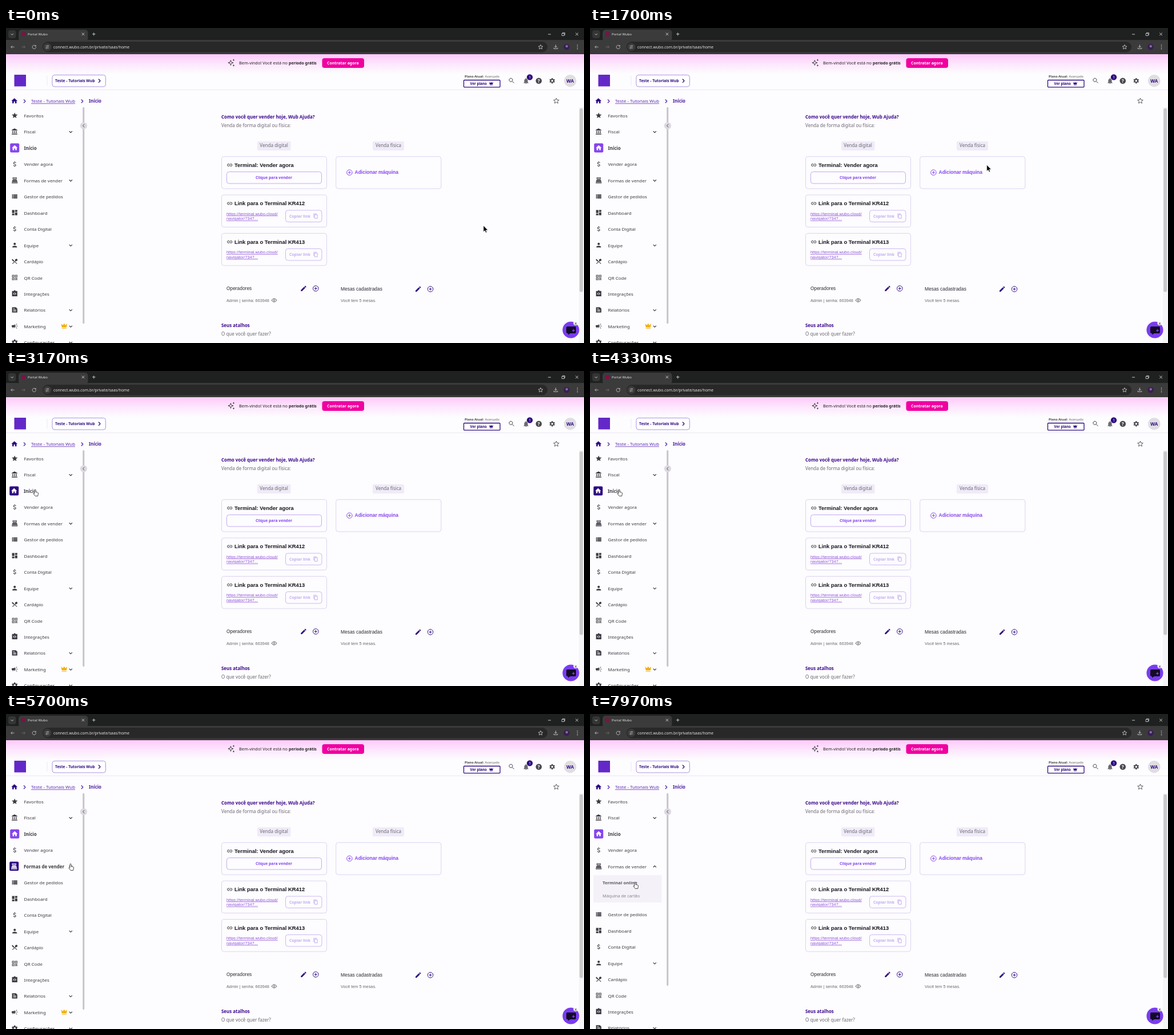
An HTML page that plays this animation: 1012 px wide and 553 px high, repeating every 8000 ms.

```html
<!DOCTYPE html>
<html lang="pt-BR">
<head>
<meta charset="utf-8">
<title>Portal Wubo</title>
<style>
html, body { margin: 0; width: 100%; height: 100%; overflow: hidden; background: #fdfcfe; }
svg { display: block; width: 100vw; height: 100vh; }
text { white-space: pre; }
</style>
</head>
<body>
<svg id="stage" viewBox="0 0 1012 553">
  <defs>
    <linearGradient id="banner" x1="0" y1="0" x2="0" y2="1">
      <stop offset="0" stop-color="#fdc9fb"/><stop offset=".5" stop-color="#fde6fd"/><stop offset="1" stop-color="#fdfcfe"/>
    </linearGradient>
    <clipPath id="subClip"><rect id="subBox" x="6" y="283" width="120" height="0"/></clipPath>
  </defs>
</svg>
<script>
const NS = 'http://www.w3.org/2000/svg';
const stage = document.getElementById('stage');
const NOTO = '"Noto Sans", sans-serif', ARIAL = '"Liberation Sans", Arial, sans-serif';
const NAVY = '#2d0a82', VIOLET = '#8445ee', INK = '#3c3a42', GREY = '#6a6870', LIGHT = '#d6d6d6';

function el(tag, attrs, parent = stage) {
  const e = document.createElementNS(NS, tag);
  for (const k in attrs) e.setAttribute(k, attrs[k]);
  parent.appendChild(e);
  return e;
}
function label(x, y, str, size, fill, weight = 400, font = NOTO, parent = stage, extra = {}) {
  const t = el('text', { x, y, 'font-size': size, fill, 'font-weight': weight, 'font-family': font, ...extra }, parent);
  t.textContent = str;
  return t;
}
const box = (x, y, width, height, fill, rx = 0, stroke = 'none', parent = stage) =>
  el('rect', { x, y, width, height, fill, rx, stroke, 'stroke-width': .8 }, parent);
const disc = (cx, cy, r, fill, stroke = 'none', sw = 1) =>
  el('circle', { cx, cy, r, fill, stroke, 'stroke-width': sw });
const line = (d, stroke, sw = 1, parent = stage) =>
  el('path', { d, stroke, 'stroke-width': sw, fill: 'none', 'stroke-linejoin': 'round' }, parent);

// Icons live on a 24-unit grid; "~" marks an outline icon.
const ICONS = {
  star: 'M12 17.3 18.2 21l-1.7-7L22 9.2l-7.2-.6L12 2 9.2 8.6 2 9.2 7.5 14l-1.7 7z',
  bank: 'M4 10v7h3v-7zm6 0v7h3v-7zM2 22h19v-3H2zm14-12v7h3v-7zM11.5 1 2 6v2h19V6z',
  home: 'M10 20v-6h4v6h5v-8h3L12 3 2 12h3v8z',
  money: '~M16 8.5C16 5.5 8 5 8 9s8 2.5 8 6.5-8 3.5-8 0M12 3v3m0 12v3',
  till: 'M5 2h14v6H5zm2 2v2h10V4zM2 19h20v3H2zM6 9h12l4 9H2zm1 2v2h2v-2zm4 0v2h2v-2zm4 0v2h2v-2z',
  list: 'M3 5h4v4H3zm0 5h4v4H3zm0 5h4v4H3zM8 5h13v4H8zm0 5h13v4H8zm0 5h13v4H8z',
  tiles: 'M3 13h8V3H3zm0 8h8v-6H3zm10 0h8V11h-8zm0-18v6h8V3z',
  person: 'M12 12a4 4 0 1 0 0-8 4 4 0 0 0 0 8m0 2c-2.7 0-8 1.3-8 4v2h16v-2c0-2.7-5.3-4-8-4',
  cutlery: 'M8 13.3l2.9-2.8-7-7a4 4 0 0 0 0 5.7zm6.9-1.8c1.5.7 3.7.2 5.3-1.4 4-4-1.4-9.2-5.3-5.3-1.6 1.6-2.1 3.7-1.4 5.3L3.7 19.9l1.4 1.4 6.9-6.9 6.9 6.9 1.4-1.4-6.9-6.9z',
  code: 'M3 3h8v8H3zm2 2v4h4V5zM3 13h8v8H3zm2 2v4h4v-4zm8-12h8v8h-8zm2 2v4h4V5zm-2 8h3v3h-3zm5 0h3v3h-3zm-2.500 2.500h3v3h-3zM13 18h3v3h-3zm5 0h3v3h-3z',
  plug: 'M3 3h6a3 3 0 0 1 6 0h6v18H3zM10.500 8l-4 4 4 4 1.200-1.200L8.900 12l2.800-2.800zm3 0-1.200 1.200 2.800 2.800-2.800 2.800 1.200 1.200 4-4z',
  page: 'M3 3h13l5 5v13H3zm4 4v2h5V7zm0 4v2h10v-2zm0 4v2h10v-2z',
  horn: 'M2 9h6l5-3v12l-5-3H7v4H5v-4H2zm16 2h4v2h-4zm-2-4.600L19.200 4l1.200 1.600L17.200 8zm0 11.200 3.200 2.400 1.200-1.600-3.200-2.400zM14 8.600a4.500 4.500 0 0 1 0 6.700z',
  bell: 'M10 20h4a2 2 0 0 1-4 0m8-4v-5c0-3-1.600-5.600-4.500-6.300V4a1.500 1.500 0 0 0-3 0v.7C7.600 5.400 6 8 6 11v5l-2 2v1h16v-1z',
  pencil: 'M3 17.200V21h3.800L17.800 9.900 14 6.200zM20.700 7a1 1 0 0 0 0-1.400l-2.300-2.300a1 1 0 0 0-1.400 0l-1.900 1.800 3.800 3.800z',
  crown: 'M5 16 3 5l5.500 5L12 4l3.500 6L21 5l-2 11zm0 2h14v2H5z',
  link: '~M10.500 7.500H7a4.500 4.500 0 0 0 0 9h3.500M13.500 7.500H17a4.500 4.500 0 0 1 0 9h-3.500M8 12h8',
  plus: '~M12 2.500a9.500 9.500 0 1 0 .01 0M12 7v10M7 12h10',
  copy: '~M8 6h12v16H8zM4 18V2h13',
  eye: '~M1.500 12Q12-2 22.500 12 12 26 1.500 12zM12 9a3 3 0 1 0 .01 0',
  search: '~M9.500 3.500a6 6 0 1 0 .01 0M14 14l6.500 6.500',
  gear: 'M10 2h4l.6 3 2.400 1.400 2.900-1 2 3.500L19.600 11v2l2.300 2-2 3.500-2.900-1-2.400 1.400-.6 3h-4l-.6-3L7 17.500l-2.900 1-2-3.500L4.400 13v-2L2.100 9l2-3.500 2.900 1L9.400 5zm2 6.500a3.500 3.500 0 1 0 .01 0',
  load: '~M12 3v11M7 10l5 5 5-5M4 16v4h16v-4',
  back: '~M21 12H4M11 5l-7 7 7 7',
  next: '~M3 12h17M13 5l7 7-7 7',
  reload: '~M19 7.500A8.500 8.500 0 1 0 20.500 12M20 3v5.500h-5.500',
  tune: '~M3 7h8m7 0h3M3 17h3m7 0h8M15 4a3 3 0 1 0 .01 0M9 14a3 3 0 1 0 .01 0',
  spark: '~M11 4l2 6 6 2-6 2-2 6-2-6-6-2 6-2zM20 1v5M17.500 3.500h5M20 18v5M17.500 20.500h5'
};
function icon(name, cx, cy, size, color, parent = stage, sw = 2) {
  const d = ICONS[name], k = size / 24, open = d[0] === '~';
  return el('path', {
    d: open ? d.slice(1) : d, transform: `translate(${cx - size / 2} ${cy - size / 2}) scale(${k})`,
    fill: open ? 'none' : color, stroke: open ? color : 'none', 'stroke-width': sw, 'fill-rule': 'evenodd'
  }, parent);
}

function drawBrowser() {
  box(0, 0, 1012, 22, '#1f2020');
  box(0, 21, 1012, 25, '#3b3b3b');
  box(22, 3, 121.5, 20, '#3b3b3b', 5);
  box(4, 4, 13.5, 14, '#343535', 4);
  line('M8.500 10l2.200 2.200L13 10', LIGHT, .9);
  box(27, 7.5, 6.5, 6.5, '#7c1247');
  label(38, 13, 'Portal Wubo', 6, '#e4e4e4');
  line('M132.800 8.500l4.400 4.400m0-4.400l-4.400 4.400', LIGHT, .9);
  line('M151 10.700h5.500M153.750 8v5.500', LIGHT, .9);
  line('M949 11h5', LIGHT, .9);
  line('M973.200 9.500h4v4h-4zM974.500 9.500V8.300h4v4h-1.200', LIGHT, .8);
  line('M997.200 8.400l4.800 4.800m0-4.800l-4.800 4.800', LIGHT, .9);
  icon('back', 11.5, 33.3, 8.5, LIGHT);
  icon('next', 30.5, 33.3, 8.5, '#777');
  icon('reload', 49.3, 33.3, 9, LIGHT);
  box(64, 24, 884, 18.5, '#282828', 9.2);
  disc(72.3, 33.3, 7, '#3b3b3b');
  icon('tune', 72.3, 33.3, 8, LIGHT);
  label(83, 35.8, 'connect.wubo.com.br/private/saas/home', 6.86, '#e4e4e4');
  const star = icon('star', 936, 33.3, 9.5, 'none');
  star.setAttribute('stroke', LIGHT);
  icon('load', 962.5, 33, 10, LIGHT);
  disc(981.5, 33.3, 5.3, '#35214f');
  disc(981.8, 32, 2.2, '#8d62a8');
  for (const y of [30, 33.3, 36.6]) disc(1000.5, y, .8, LIGHT);
}

function drawHeader() {
  box(0, 46, 1012, 34, 'url(#banner)');
  icon('spark', 394, 61, 13.5, INK, stage, 1.7);
  label(408, 64, 'Bem-vindo! Você está no', 7.37, '#222');
  label(495, 64, 'período grátis', 6.95, '#222', 700);
  box(553.5, 53, 73.5, 17, '#f000a0', 4);
  label(562, 64, 'Contratar agora', 6.95, '#fff', 700);

  box(14.5, 82, 20.5, 20.5, '#6428c8');
  line('M72 84v17', '#e6e2ee', .7);
  box(81, 82.5, 93.5, 20.500, '#fff', 4, '#9b7ae0');
  label(86, 95.2, 'Teste - Tutoriais Wub', 6.7, NAVY, 700);
  line('M162 89.500l3 3.200-3 3.200', NAVY, 1.3);
  label(803, 87.4, 'Plano Atual:', 5.55, '#444', 700);
  label(838.5, 87.4, 'Avançado', 5.55, '#666');
  el('rect', { x: 801.5, y: 91.500, width: 63.500, height: 12.300, fill: '#fff', stroke: NAVY, 'stroke-width': 1.3, rx: 1 });
  label(812.5, 100, 'Ver plano', 6.2, NAVY, 700);
  icon('crown', 849.5, 97.4, 9, NAVY);
  icon('search', 885.2, 92.5, 12, INK);
  icon('bell', 910.5, 93, 12.5, GREY);
  disc(917, 86.4, 5.2, NAVY);
  label(917, 88.700, '1', 6.3, '#fff', 400, NOTO, stage, { 'text-anchor': 'middle' });
  disc(932.800, 92.700, 5.3, '#4a4850');
  label(932.800, 95.800, '?', 8.500, '#fff', 700, NOTO, stage, { 'text-anchor': 'middle' });
  icon('gear', 956.3, 92.7, 11.5, '#4a4850');
  disc(987.800, 92.700, 10.700, '#e0dee2');
  label(987.8, 95.7, 'WA', 8, NAVY, 700, NOTO, stage, { 'text-anchor': 'middle' });
  line('M0 108.500H1012', '#e9e6ef', .8);

  icon('home', 14.700, 128, 12.800, NAVY);
  line('M31 125.500l3 3-3 3M131.800 125.500l3 3-3 3', '#4c1fa3', 1.2);
  label(44, 131.4, 'Teste - Tutoriais Wub', 7.9, '#5b2bb5', 400, NOTO, stage, { 'text-decoration': 'underline' });
  label(145, 131.4, 'Início', 7.9, '#4a1a9e', 700);
  const star = icon('star', 963.5, 127.8, 11.5, 'none');
  star.setAttribute('stroke', '#555');
}

function linkCard(y, code) {
  box(377.5, y, 184, 56.500, '#fdfcff', 4, '#d5caee');
  icon('link', 391.700, y + 15, 10.500, '#222');
  label(400, y + 18.2, 'Link para o Terminal ' + code, 9.42, '#17151c', 700, ARIAL);
  const under = { 'text-decoration': 'underline' };
  label(386, y + 35.5, 'https://terminal.wubo.cloud/', 7.38, '#9358d8', 400, ARIAL, stage, under);
  label(386, y + 44.2, 'navigator/7347...', 7.38, '#9358d8', 400, ARIAL, stage, under);
  box(489.500, y + 27, 63.500, 20.500, '#fdfcff', 4, '#c0a8ee');
  label(496, y + 39.8, 'Copiar link', 6.85, '#c3adf0', 700);
  icon('copy', 542, y + 37.200, 9.500, '#b79be9');
}

function drawPage() {
  label(377, 159.4, 'Como você quer vender hoje, Wub Ajuda?', 7.95, '#3b0a8c', 700);
  label(377, 174.3, 'Venda de forma digital ou física:', 8.08, GREY);
  box(440, 199, 58.5, 16, '#f0ebf8', 2);
  label(444.3, 209.3, 'Venda digital', 8.08, GREY);
  box(642, 199, 55, 16, '#f0ebf8', 2);
  label(647, 209.3, 'Venda física', 8.08, GREY);

  box(377.5, 225.7, 184, 56.3, '#fdfcff', 4, '#d5caee');
  icon('link', 391.700, 240.600, 10.500, '#222');
  label(400, 243.7, 'Terminal: Vender agora', 9.42, '#17151c', 700, ARIAL);
  box(386.5, 252.5, 166, 20.5, '#fdfcff', 4, '#b497ee');
  label(437, 265.4, 'Clique para vender', 6.8, VIOLET, 700);
  box(577.700, 225.700, 184.200, 56.300, '#fdfcff', 4, '#d5caee');
  icon('plus', 601.4, 253.7, 12, VIOLET);
  label(610.500, 256.400, 'Adicionar máquina', 8.5, VIOLET, 700, ARIAL);
  linkCard(293, 'KR412');
  linkCard(360.5, 'KR413');

  label(386, 459.7, 'Operadores', 8.4, '#2c2a32', 400, ARIAL);
  icon('pencil', 521, 457.3, 12.5, NAVY);
  icon('plus', 542.3, 457.3, 12, NAVY);
  label(386, 480.7, 'Admin | senha: 663948', 7.3, GREY, 400, ARIAL);
  icon('eye', 469.5, 478, 10.500, '#444');
  label(586, 460.7, 'Mesas cadastradas', 8.42, '#2c2a32', 400, ARIAL);
  icon('pencil', 721.7, 458.3, 12.5, NAVY);
  icon('plus', 743, 458.3, 12, NAVY);
  label(586, 480.7, 'Você tem 5 mesas.', 7.3, GREY, 400, ARIAL);
  label(377, 525, 'Seus atalhos', 7.95, '#3b0a8c', 700);
  label(377, 539.7, 'O que você quer fazer?', 8.07, GREY);

  box(1003, 139, 9, 414, '#f5f4f6');
  box(1004.2, 141, 6, 322.500, '#c9c8cb', 3);
  disc(989, 530, 14.6, '#7a3cf0');
  disc(997.5, 518, 4, '#fdfcfe');
  label(997.500, 520.600, 'x', 8, '#222', 400, ARIAL, stage, { 'text-anchor': 'middle' });
  el('path', { d: 'M983 524h13q2 0 2 2v8q0 2-2 2h-8l-4 2.500v-2.500h-1q-2 0-2-2v-8q0-2 2-2z', fill: '#130a24' });
  el('path', { d: 'M993.500 528l.9 2.100 2.100.9-2.100.9-.9 2.100-.9-2.100-2.100-.9 2.100-.9z', fill: '#7a3cf0' });
}

const STEP = 28.45, TOP = 154, ACTIVE = 2, SALES = 4, DROP = 56;
const MENU = [
  ['Favoritos', 'star'], ['Fiscal', 'bank', 1], ['Início', 'home'], ['Vender agora', 'money'],
  ['Formas de vender', 'till', 1], ['Gestor de pedidos', 'list'], ['Dashboard', 'tiles'],
  ['Conta Digital', 'money'], ['Equipe', 'person', 1], ['Cardápio', 'cutlery'], ['QR Code', 'code'],
  ['Integrações', 'plug'], ['Relatórios', 'page', 1], ['Marketing', 'horn', 1], ['Configurações', 'gear', 1]
];
let rows, subs, subBox, thumb, arrow, hand;

function drawSidebar() {
  rows = MENU.map(([name, pic, more]) => {
    const g = el('g', {}), lead = el('g', {}, g);
    const tile = box(7.2, -8.5, 16, 16, VIOLET, 2, 'none', lead);
    const mark = icon(pic, 15.2, -.5, 12.3, INK, lead);
    const text = label(31.500, 3, name, 7.95, INK, 400, NOTO, g);
    const chev = more && line('M110.700-1.300l2.600 2.600 2.600-2.600', '#333', 1.1, g);
    if (pic === 'horn') icon('crown', 101.800, -.7, 14, '#f2ae0b', g);
    return { g, lead, tile, mark, text, chev, open: ICONS[pic][0] === '~' };
  });
  const panel = el('g', { 'clip-path': 'url(#subClip)' });
  box(6, 283, 119.5, 48, '#f4f2f8', 0, 'none', panel);
  subs = ['Terminal online', 'Máquina de cartão'].map((s, i) =>
    label(22, 298.500 + 23.800 * i, s, 7.4, '#85838c', 400, NOTO, panel));
  subBox = document.getElementById('subBox');
  thumb = box(134.300, 139, 3, 380, '#c6c4ca', 1.5);
  disc(136, 171.6, 6.1, '#dcd9e0');
  line('M137.300 168.800l-2.800 2.800 2.800 2.800', '#444', 1);
}

function drawPointers() {
  arrow = el('path', { d: 'M0 0V10.800L2.500 8.600 4.100 12.300 5.800 11.500 4.200 7.900H7.600z', fill: '#000', stroke: '#fff', 'stroke-width': .5 });
  hand = el('path', { d: 'M-1.100.6a1.100 1.100 0 0 1 2.200 0V4l3.400.8q1.200.4 1 1.700L4.700 11H.2L-2.900 7.100q-.4-1.200.8-1.100l1 .8z', fill: '#fff', stroke: '#222', 'stroke-width': .8 });
}

const ease = u => u * u * (3 - 2 * u);
const ramp = (t, a, b) => ease(Math.min(1, Math.max(0, (t - a) / (b - a))));
// Pointer moves: start, end, x, y
const MOVES = [[250, 1000, 855, 273], [1350, 2400, 240, 148], [2500, 3150, 51, 208.5], [4500, 5200, 113, 263.500], [6750, 7300, 79, 295.5]];
function pointer(t) {
  let x = 836, y = 347;
  for (const [a, b, tx, ty] of MOVES) {
    const k = ramp(t, a, b);
    x += (tx - x) * k;
    y += (ty - y) * k;
  }
  return [x, y];
}

function update(t) {
  const [x, y] = pointer(t), open = ramp(t, 5950, 6180);
  const inMenu = x < 130;
  const overSub = inMenu && open === 1 && y > 283 && y < 331;
  const over = inMenu && !overSub ? Math.round((y - TOP) / STEP) : -1;

  rows.forEach((r, i) => {
    const hot = i === over, lit = hot || i === ACTIVE;
    const ry = TOP + STEP * i + (i > SALES ? DROP * open : 0);
    r.g.setAttribute('transform', `translate(0 ${ry})`);
    r.lead.setAttribute('transform', `translate(${hot ? -1 : 0} 0)`);
    r.tile.setAttribute('visibility', lit ? 'visible' : 'hidden');
    r.tile.setAttribute('fill', hot ? NAVY : VIOLET);
    r.mark.setAttribute(r.open ? 'stroke' : 'fill', lit ? '#fff' : INK);
    r.text.setAttribute('font-weight', lit ? 700 : 400);
    r.text.setAttribute('x', hot ? 31 : 31.5);
  });
  rows[SALES].chev.setAttribute('transform', open > .5 ? 'scale(1 -1)' : '');

  subBox.setAttribute('height', 48 * open);
  subs.forEach((s, i) => {
    const hot = overSub && i === (y < 307 ? 0 : 1);
    s.setAttribute('font-weight', hot ? 700 : 400);
    s.setAttribute('font-size', hot ? 7.8 : 7.4);
    s.setAttribute('fill', hot ? '#5c5a63' : '#85838c');
  });
  thumb.setAttribute('height', 380 - 42 * open);

  arrow.setAttribute('visibility', inMenu ? 'hidden' : 'visible');
  hand.setAttribute('visibility', inMenu ? 'visible' : 'hidden');
  (inMenu ? hand : arrow).setAttribute('transform', `translate(${x} ${y})`);
}

drawBrowser();
drawHeader();
drawPage();
drawSidebar();
drawPointers();

const start = performance.now();
function frame(now) {
  update(Math.max(0, now - start) % 8000);
  requestAnimationFrame(frame);
}
update(0);
requestAnimationFrame(frame);
</script>
</body>
</html>
```
